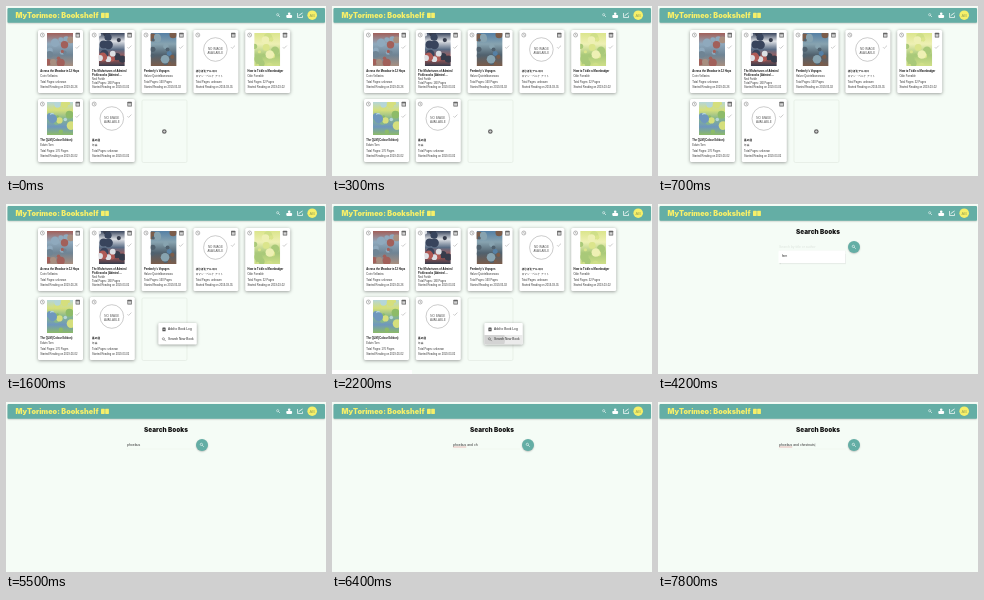
Recreate the animation shown at these times as an HTML page with a canvas. Size 320 px wide and 170 px high, loop 8000 ms.

```html
<!DOCTYPE html>
<html lang="en">
<head>
<meta charset="utf-8">
<title>Bookshelf</title>
<style>
html, body { margin: 0; width: 100%; height: 100%; overflow: hidden; background: #f5fcf6; }
canvas { display: block; width: 320px; height: 170px; }
</style>
</head>
<body>
<canvas id="stage"></canvas>
<script>
const W = 320, H = 170, LOOP = 8000;
const MENU_AT = 1500, HOVER_AT = 1800, CLICK_AT = 2050, SEARCH_AT = 2300, TYPE_AT = 4200;
const TEAL = '#64aea5', YELLOW = '#f6ef69', PAGE = '#f5fcf6', INK = '#222';
const BODY = '"Liberation Sans", "Noto Sans CJK JP", "Noto Sans CJK", sans-serif';
const HEAVY = 'Inter, sans-serif';
const canvas = document.getElementById('stage');
const ctx = canvas.getContext('2d');
const dpr = window.devicePixelRatio || 1;
canvas.width = W * dpr;
canvas.height = H * dpr;

function box(x, y, w, h, color, r = 0) {
  ctx.fillStyle = color;
  ctx.beginPath();
  ctx.roundRect(x, y, w, h, r);
  ctx.fill();
}

function disc(x, y, r, color) {
  ctx.fillStyle = color;
  ctx.beginPath();
  ctx.arc(x, y, r, 0, Math.PI * 2);
  ctx.fill();
}

function ring(x, y, r, color, width = 0.5) {
  ctx.strokeStyle = color;
  ctx.lineWidth = width;
  ctx.beginPath();
  ctx.arc(x, y, r, 0, Math.PI * 2);
  ctx.stroke();
}

function line(color, width, ...points) {
  ctx.strokeStyle = color;
  ctx.lineWidth = width;
  ctx.beginPath();
  points.forEach(([x, y]) => ctx.lineTo(x, y));
  ctx.stroke();
}

// Lay tiny type out at ten times its size so that letter spacing stays even.
function text(str, x, y, size, { color = INK, weight = 400, align = 'left', family = BODY } = {}) {
  ctx.save();
  ctx.translate(x, y);
  ctx.scale(0.1, 0.1);
  ctx.font = `${weight} ${size * 10}px ${family}`;
  ctx.textAlign = align;
  ctx.textBaseline = 'middle';
  ctx.fillStyle = color;
  ctx.fillText(str, 0, 0);
  const width = ctx.measureText(str).width / 10;
  ctx.restore();
  return width;
}

function shadowed(draw, blur = 3.5, alpha = 0.4) {
  ctx.save();
  ctx.shadowColor = `rgba(0,0,0,${alpha})`;
  ctx.shadowBlur = blur * dpr;
  ctx.shadowOffsetY = 0.8 * dpr;
  draw();
  ctx.restore();
}

function clipped(x, y, w, h, draw) {
  ctx.save();
  ctx.beginPath();
  ctx.rect(x, y, w, h);
  ctx.clip();
  draw();
  ctx.restore();
}

function magnifier(x, y, size, color) {
  ring(x - size * 0.15, y - size * 0.15, size * 0.27, color, size * 0.13);
  line(color, size * 0.15, [x + size * 0.05, y + size * 0.05], [x + size * 0.42, y + size * 0.42]);
}

function header() {
  shadowed(() => box(1.5, 2, 317.5, 14.8, TEAL, 1), 1.5, 0.2);
  text('MyTorimeo: Bookshelf', 9.5, 9.5, 7.3, { color: YELLOW, weight: 900, family: HEAVY });
  box(95, 6.8, 3.7, 5.2, YELLOW, 0.4);
  box(99.2, 6.8, 3.7, 5.2, YELLOW, 0.4);
  magnifier(272.3, 9.3, 4, '#fff');
  disc(283.2, 7.7, 1.3, '#fff');
  box(280.3, 9, 5.8, 2.9, '#fff', 0.8);
  line('#fff', 0.7, [291.5, 7], [291.5, 11.5], [296.5, 11.5], [296.5, 9.5]);
  line('#fff', 0.8, [292.5, 10], [294, 8.6], [296.6, 7]);
  disc(306.2, 9.2, 4.8, YELLOW);
  text('AB', 306.2, 9.5, 4, { color: '#98a552', align: 'center' });
}

function seeded(seed) {
  return () => {
    seed = (seed * 16807) % 2147483647;
    return seed / 2147483647;
  };
}

// A cover is a soft vertical gradient with scattered blobs in its own tones.
function cover(x, y, w, h, tones) {
  const random = seeded(parseInt(tones[0].slice(1), 16));
  const fill = ctx.createLinearGradient(0, y, 0, y + h);
  tones.forEach((tone, i) => fill.addColorStop(i / (tones.length - 1), tone));
  clipped(x, y, w, h, () => {
    box(x, y, w, h, fill);
    for (let i = 0; i < 14; i++) {
      const tone = tones[Math.floor(random() * tones.length)];
      disc(x + random() * w, y + random() * h, 1.5 + random() * 3, tone);
    }
  });
}

const books = [
  { titles: ['Across the Meadow in 12 Hops'], author: 'Corin Vellastra', date: '2019-03-26',
    tones: ['#a2605a', '#8fa9bd', '#6f8494', '#a88f80'] },
  { titles: ['The Misfortunes of Admiral', 'Picklesocks (Admiral ...'], author: 'Ned Farkle',
    pages: '160 Pages', tones: ['#38445c', '#dcdfe4', '#5b6d85', '#b05a55', '#363c4c'] },
  { titles: ["Pemberly's Voyages"], author: 'Halvor Quintelbarranoza', pages: '160 Pages',
    tones: ['#5580a5', '#87a3b0', '#50616e', '#7b5d4b'] },
  { titles: ['ぽむぽむアルコロ'], author: 'ロマン・ベルナ アイト', date: '2019-03-01' },
  { titles: ['How to Tickle a Moonbadger'], author: 'Odin Farrable', pages: '32 Pages',
    tones: ['#dbe58c', '#eef0b4', '#a9c979', '#cfdf88'] },
  { titles: ['The QLM (Colour Edition)'], author: 'Edwin Tarn', pages: '176 Pages',
    tones: ['#b5d6d8', '#d5df7d', '#86b68c', '#6f97bd', '#8dbb68'] },
  { titles: ['霧の庭'], author: '年森' }
];

function card(x, y, { titles, author, pages = 'unknown', date = '2019-03-02', tones }) {
  shadowed(() => box(x, y, 45, 63, '#fff', 1.5));
  if (tones) {
    cover(x + 9, y + 3, 26, 33, tones);
  } else {
    ring(x + 22, y + 19.5, 11.8, '#999', 0.5);
    ['NO IMAGE', 'AVAILABLE'].forEach((str, i) =>
      text(str, x + 22, y + 19.3 + i * 3.6, 3, { color: '#555', align: 'center' }));
  }
  ring(x + 4.4, y + 5, 2, '#777', 0.5);
  line('#777', 0.5, [x + 4.4, y + 3.8], [x + 4.4, y + 5.2], [x + 5.3, y + 5.7]);
  box(x + 37.6, y + 2.8, 4.4, 4.6, '#666', 0.5);
  box(x + 38.3, y + 4.3, 3, 2.4, '#d4d4d4');
  line('#aaa', 0.6, [x + 37.6, y + 17.2], [x + 38.8, y + 18.4], [x + 41.6, y + 15.6]);

  const lines = [...titles, author, 'Total Pages: ' + pages, 'Started Reading on ' + date];
  const pitch = 16.5 / (lines.length - 1);
  lines.forEach((str, i) => {
    const style = i < titles.length ? { weight: 700, color: '#111' } : { color: '#333' };
    text(str, x + 2.3, y + 40.8 + i * pitch, 2.65, style);
  });
}

function menu(t) {
  shadowed(() => box(152.3, 119, 38.5, 21.5, '#fff', 1));
  if (t >= HOVER_AT) box(152.3, 131, 38.5, 9, '#ebebeb');
  if (t >= CLICK_AT) {
    const radius = 20 * (t - CLICK_AT) / (SEARCH_AT - CLICK_AT);
    clipped(152.3, 131, 38.5, 9, () => disc(161, 135.5, radius, 'rgba(0,0,0,.1)'));
  }
  box(156.4, 123.5, 3.2, 3.8, '#555', 0.4);
  line('#fff', 0.5, [157.1, 125.4], [158.9, 125.4]);
  magnifier(158, 135.4, 4, '#555');
  ['Add to Book Log', 'Search New Book'].forEach((str, i) => text(str, 162, 125.5 + i * 10, 3.2));
}

function shelf(t) {
  books.forEach((book, i) => card(32 + (i % 5) * 51.8, 24 + Math.floor(i / 5) * 69, book));
  ctx.strokeStyle = '#dfe7e0';
  ctx.lineWidth = 0.6;
  ctx.beginPath();
  ctx.roundRect(136, 94, 45, 62.5, 1.5);
  ctx.stroke();
  if (t < MENU_AT) {
    disc(158.3, 125.5, 2.3, '#666');
    line('#fff', 0.5, [157, 125.5], [159.6, 125.5]);
    line('#fff', 0.5, [158.3, 124.2], [158.3, 126.8]);
  } else {
    menu(t);
  }
  if (t >= CLICK_AT) box(0, 166, 80, 4, '#fff');
}

const WORD = 'phoebus', QUERY = WORD + ' and chestnuts';
// Typing comes in bursts: [time, letters on screen].
const bursts = [[TYPE_AT, 0], [4600, 4], [5500, 7], [6100, 12], [6800, 18], [7300, 21]];

function lettersAt(t) {
  const next = bursts.findIndex(([time]) => time > t);
  if (next === 0) return 0;
  if (next < 0) return QUERY.length;
  const [[t0, n0], [t1, n1]] = bursts.slice(next - 1, next + 1);
  return Math.floor(n0 + (n1 - n0) * (t - t0) / (t1 - t0));
}

function search(t) {
  text('Search Books', 160, 27.6, 6.4, { color: '#111', weight: 900, align: 'center', family: HEAVY });
  shadowed(() => disc(196, 43, 6, TEAL), 1.5, 0.25);
  magnifier(196, 43, 4.2, '#fff');
  line('#eaf3eb', 0.5, [120, 47], [188, 47]);

  const typed = QUERY.slice(0, lettersAt(t));
  let width = 0;
  if (typed) {
    if (typed.length > WORD.length) {
      const wordWidth = text(WORD, 121, 43, 3.45, { color: 'transparent' });
      line('rgba(205,70,70,.75)', 0.5, [121, 45], [121 + wordWidth, 45]);
    }
    width = text(typed, 121, 43, 3.45, { color: '#333' });
  } else {
    text('Search by title or author', 121, 43, 3.45, { color: '#dde4de' });
  }
  if ((t + 300) % 1000 < 500) line('#777', 0.35, [121.3 + width, 41.3], [121.3 + width, 44.7]);

  if (t >= TYPE_AT && t < TYPE_AT + 300) {
    shadowed(() => box(120.5, 46.5, 67, 12.5, '#fff'), 1, 0.12);
    text('fern', 124, 52.3, 3.1);
  }
  if (t < SEARCH_AT + 200) box(0, 166, 106, 4, '#fff');
}

function render(now) {
  const t = now % LOOP;
  ctx.setTransform(dpr, 0, 0, dpr, 0, 0);
  box(0, 0, W, H, PAGE);
  header();
  (t < SEARCH_AT ? shelf : search)(t);
  requestAnimationFrame(render);
}

requestAnimationFrame(render);
</script>
</body>
</html>
```
